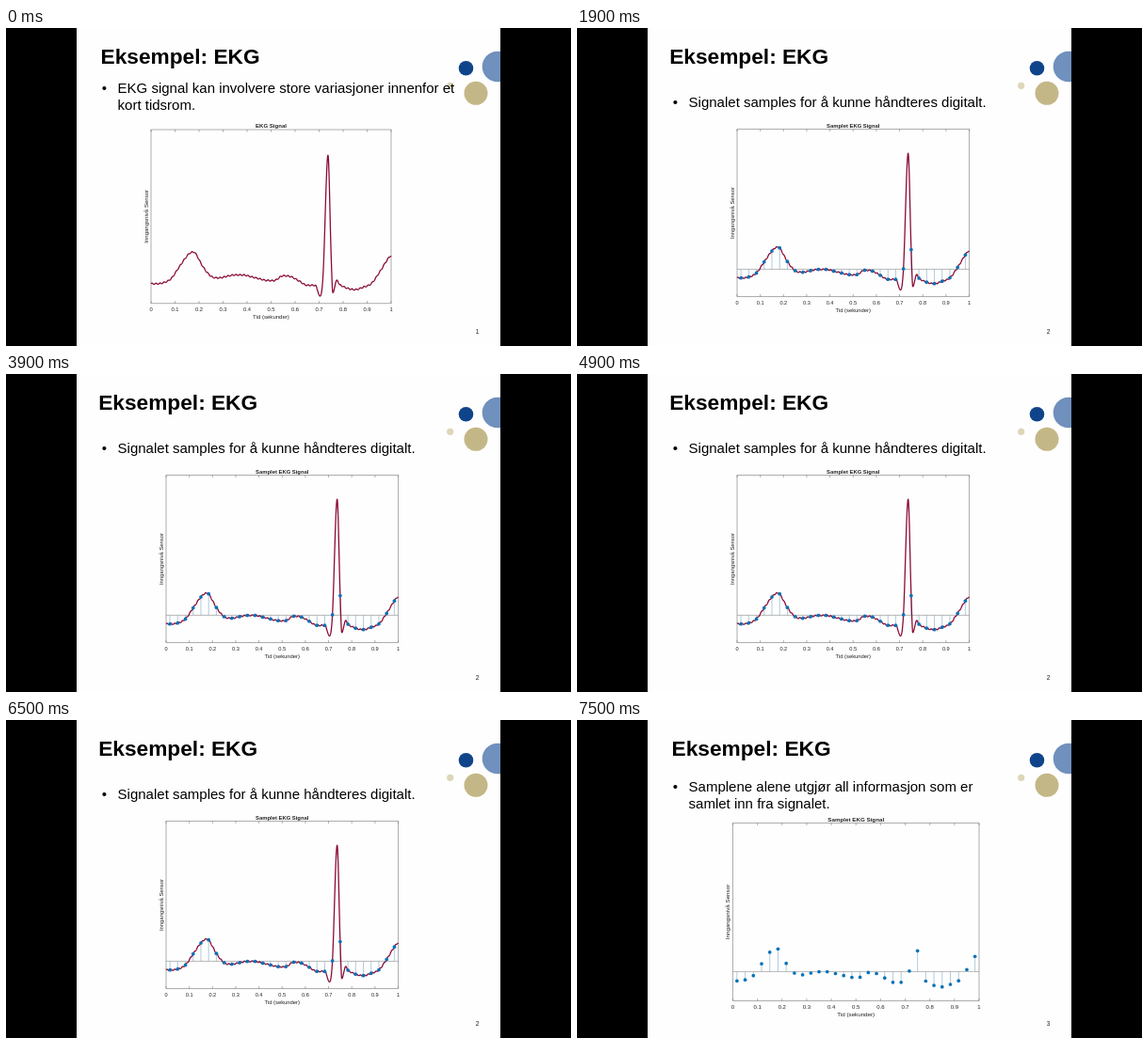
Animation of 600x338 px, one loop 8000 ms. Source, as an HTML page:

```html
<!DOCTYPE html>
<html lang="no">
<head>
<meta charset="utf-8">
<style>
html, body { margin: 0; width: 100%; height: 100%; overflow: hidden; background: #000; }
svg { display: block; width: 600px; height: 338px; font-family: "Liberation Sans", Arial, sans-serif; }
.head { font: bold 22.7px "Liberation Sans", Arial, sans-serif; }
.body { font-size: 15px; }
.small { fill: #222; text-anchor: middle; }
</style>
</head>
<body>
<svg viewBox="0 0 600 338">
  <rect x="75" width="450" height="338" fill="#fefefe"/>
  <clipPath id="page"><rect x="75" width="450" height="338"/></clipPath>
  <g clip-path="url(#page)">
    <circle cx="488.5" cy="42.7" r="7.8" fill="#10448a"/>
    <circle cx="522" cy="41" r="16.3" fill="#7090bd"/>
    <circle cx="499" cy="69.3" r="12.5" fill="#c4b787"/>
    <circle cx="471.7" cy="61.3" r="3.6" fill="#ddd6b9"/>
  </g>
  <g id="slides"></g>
</svg>
<script>
// Signal heights above the zero line at t = (i + 0.5) / 30
const samples = [-9.3, -8.3, -4, 7.8, 19.4, 22.7, 8.2, -1.5, -3.2, -1.5, -.2, -.2, -2, -4, -5.8,
  -5.7, -1, -2, -6.4, -10.8, -10.8, .5, 20.8, -9.5, -13.8, -15.3, -12.8, -9.2, 2, 15.2];
const dots = samples.map((v, i) => [(i + .5) / 30, v]);
// Extra knots for the ends and the sharp spike
const knots = [...dots, [0, -9.2], [.17, 23.2], [.704, -22], [.737, 123.5], [.757, -18.5], [.774, -5.5], [1, 19.5]]
  .sort((a, b) => a[0] - b[0]);

function slope(i) {
  const a = knots[i - 1], b = knots[i], c = knots[i + 1];
  if (!a || !c || (b[1] - a[1]) * (c[1] - b[1]) <= 0) return 0;
  return (c[1] - a[1]) / (c[0] - a[0]);
}

function signal(t) {
  let i = 0;
  while (i < knots.length - 2 && t > knots[i + 1][0]) i++;
  const [t0, v0] = knots[i], [t1, v1] = knots[i + 1], h = t1 - t0, u = (t - t0) / h;
  const s = u * u * (3 - 2 * u);
  const hum = t > .69 && t < .79 ? 0 : .6 * Math.sin(120 * Math.PI * t);
  return v0 + (v1 - v0) * s + h * u * (1 - u) * ((1 - u) * slope(i) - u * slope(i + 1)) + hum;
}

const text = (x, y, s, attrs) => `<text x="${x}" y="${y}" ${attrs}>${s}</text>`;
const path = (d, color, width) => `<path d="${d}" fill="none" stroke="${color}" stroke-width="${width}" stroke-linejoin="round"/>`;

function chart({ box: [l, t, r, b], zero, scale, size, title, curve, stems }) {
  const X = p => l + p * (r - l), Y = v => zero - v * scale, mid = (l + r) / 2;
  const small = `class="small" font-size="${size}"`;
  let ticks = "", out = "";
  for (let i = 0; i <= 10; i++) {
    const x = X(i / 10);
    ticks += `M${x} ${b}v-2.5M${x} ${t}v2.5`;
    out += text(x, b + 8.6, i / 10, `class="small" font-size="${size * .96}"`);
  }
  out += path(`M${l} ${t}H${r}V${b}H${l}Z` + ticks, "#777", .6);
  out += text(mid, t - 1.7, title, small + ' font-weight="bold"');
  out += text(mid, b + 16, "Tid (sekunder)", small);
  const ym = (t + b) / 2;
  out += text(l - 3.4, ym, "Inngangsnivå Sensor", `${small} transform="rotate(-90 ${l - 3.4} ${ym})"`);
  if (stems) {
    out += path(`M${l} ${zero}H${r}`, "#888", .6);
    out += path(dots.map(([p, v]) => `M${X(p)} ${zero}V${Y(v)}`).join(""), "#7fa9c4", .6);
  }
  if (curve) {
    const pts = Array.from({ length: 801 }, (_, i) => `${X(i / 800).toFixed(2)} ${Y(signal(i / 800)).toFixed(2)}`);
    out += path("M" + pts.join("L"), "#8a0c38", 1.3);
  }
  if (stems) out += dots.map(([p, v]) => `<circle cx="${X(p)}" cy="${Y(v)}" r="1.85" fill="#0a72b8"/>`).join("");
  return out;
}

const slides = [
  { end: 500, x: 100.6, y: 69, lines: ["EKG signal kan involvere store variasjoner innenfor et", "kort tidsrom."],
    box: [154, 108, 409, 292.7], zero: 262.3, scale: 1.031, size: 6.05, title: "EKG Signal", curve: true },
  { end: 7500, x: 98.2, y: 83.5, lines: ["Signalet samples for å kunne håndteres digitalt."],
    box: [170, 107.5, 416.5, 285.5], zero: 256.4, scale: 1, size: 5.87, title: "Samplet EKG Signal", curve: true, stems: true },
  { end: 8000, x: 100.6, y: 76, lines: ["Samplene alene utgjør all informasjon som er", "samlet inn fra signalet."],
    box: [165.5, 109.5, 427, 298.5], zero: 267.4, scale: 1.062, size: 6.22, title: "Samplet EKG Signal", stems: true },
];

const root = document.getElementById("slides");
root.innerHTML = slides.map((s, i) => "<g>" +
  text(s.x, 38.2, "Eksempel: EKG", 'class="head"') +
  text(101.7, s.y, "•", 'class="body"') +
  s.lines.map((line, k) => text(118.6, s.y + 18.3 * k, line, 'class="body"')).join("") +
  chart(s) + text(500.5, 325, i + 1, 'class="small" font-size="6.5"') + "</g>").join("");

const start = performance.now();
function draw(now) {
  const t = Math.max(0, now - start) % 8000;
  const current = slides.findIndex(s => t < s.end);
  [...root.children].forEach((g, i) => g.style.display = i === current ? "" : "none");
  requestAnimationFrame(draw);
}
draw(start);
</script>
</body>
</html>
```
